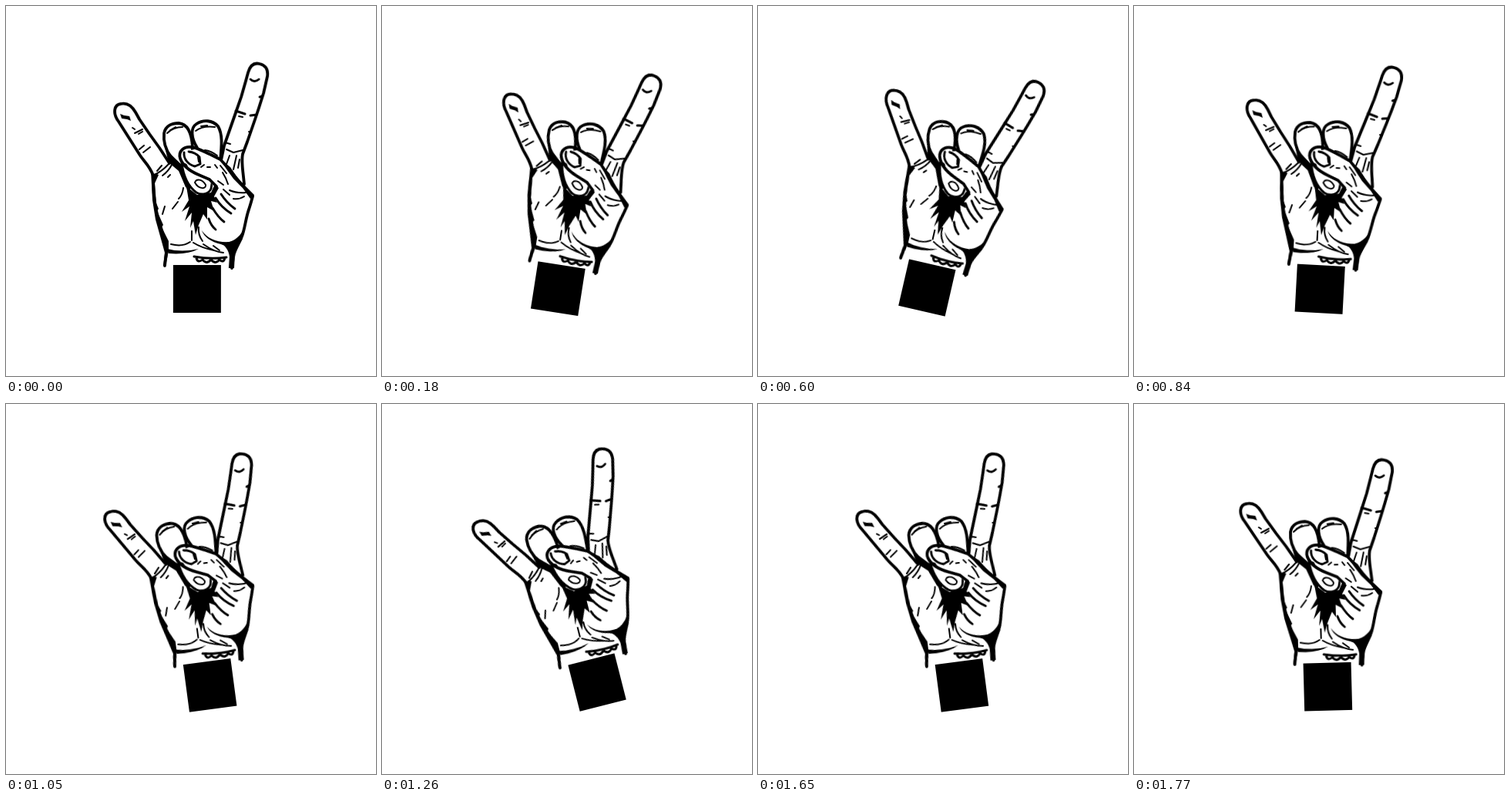
Write an HTML page without scripts that moves like this. It is 480 px wide and 480 px high and loops after 1.8 s.

```html
<!DOCTYPE html>
<html lang="en">
<head>
<meta charset="utf-8">
<title>Rock hand</title>
<style>
html, body { margin: 0; width: 100%; height: 100%; overflow: hidden; background: #fff; }
svg { display: block; width: 100vw; height: 100vh; }
.hand {
  transform-origin: 240px 240px;
  animation: sway 900ms cubic-bezier(.364, 0, .636, 1) -450ms infinite alternate;
}
@keyframes sway {
  from { transform: rotate(-15deg); }
  to { transform: rotate(15deg); }
}
.line, .mid, .fine { fill: none; stroke: #000; stroke-linecap: round; stroke-linejoin: round; }
.line { stroke-width: 3.8; }
.mid { stroke-width: 2.9; }
.fine { stroke-width: 2; }
.skin { fill: #fff; }
</style>
</head>
<body>
<svg viewBox="0 0 480 480" role="img" aria-label="Hand making the horns sign, swaying">
<g class="hand">
  <!-- palm -->
  <path class="line" d="M191 219C191 232 191 246 194 260C196 275 202 289 206 304Q209 314 208 321L206 337"/>
  <path class="line" d="M320 247Q317 258 315 264C311 275 310 289 306 299C301 309 296 317 295 326L293 340"/>
  <path d="M188 214L198 219L193 230L195 256L198 263L196 266L204 284L202 287L211 305L211 318L207 337L204 337L206 320L201 302L194 277L190 252Z"/>
  <path d="M308 290C301 304 288 309 278 306C285 312 289 317 290 325L289 340L296 340L297 322L307 302Z"/>

  <!-- pinky -->
  <path class="line skin" d="M191 220C186 207 180 203 174 194L160 172L146 150C138 139 140 128 149 127C158 125 164 131 168 138L173 147L186 166L199 184L212 204"/>
  <path d="M148 140L153 142L160 143L162 149L157 147L150 146Z"/>
  <path class="fine" d="M167 165L177 160M172 166L177 163M173 186L179 181M178 190L187 183M192 219Q202 215 211 205M196 214L202 207M164 158L167 160"/>

  <!-- index -->
  <path class="line skin" d="M279 200L283 181L290 161L297 141L305 118L311 97L314 86C317 76 322 73 329 75C337 77 340 83 339 91L334 113L328 132L323 147L313 176L307 192C305 202 307 210 309 231"/>
  <path class="mid" d="M317 95Q322 100 328 95"/>
  <path class="mid" d="M298 136L304 138L310 140M317 142L325 141M329 118L332 117"/>
  <path class="fine" d="M302 143L307 144M284 177L291 179M286 186L295 190L307 187M290 194L286 205M299 194L295 212M303 199L301 210M315 163L318 164"/>

  <!-- folded fingers -->
  <path class="line skin" d="M237 238L228 215L214 196C206 185 204 174 205 165C207 155 216 152 224 152C235 153 241 163 242 184Z"/>
  <path class="line skin" d="M248 184C240 171 239 158 247 153C256 147 268 148 275 156C281 166 280 180 278 200"/>
  <path class="fine" d="M209 165Q217 157 229 157M213 161L220 157M246 162Q255 155 271 157M253 156L261 155M258 187Q266 188 274 194"/>
  <path d="M204 176C208 189 218 196 227 205L239 239L233 235L224 214L211 203Z"/>
  <path class="mid skin" d="M228 204C230 219 236 234 247 242C254 246 263 244 266 237L268 225L247 211Z"/>
  <path class="fine" d="M245 229C247 223 255 225 259 232C260 238 250 238 245 229Z"/>

  <!-- thumb -->
  <path class="skin" d="M226 189L252 185L281 202L318 244L288 262L266 229L238 212Z"/>
  <path class="line" d="M273 234L264 225L250 219C238 214 229 206 226 198C223 188 231 182 240 183C250 184 258 190 266 193L278 199L289 211L304 230L320 246"/>
  <path class="mid" d="M231 190C230 199 237 206 245 208L252 205L251 196Q246 190 237 189"/>
  <path class="fine" d="M249 196L250 202M253 209L257 206M261 209L265 209M271 206L274 210M278 207L286 217M281 216Q286 224 288 231M275 227L282 232"/>
  <path d="M277 198L291 209L299 221L310 233L322 245L317 250L307 236L295 224L287 213Z"/>
  <path class="fine" d="M290 239Q299 243 311 242M295 250Q303 251 309 247M282 238L290 245"/>

  <!-- palm shadow -->
  <path d="M234 234L248 245L266 242L271 231L276 236L270 247L274 255L266 253L270 266L261 261L261 277L256 270L250 284L246 297L243 279L239 288L241 268L232 279L238 260L228 267L237 252Z"/>
  <path class="mid" d="M272 249Q279 261 292 269M268 262Q275 274 283 280M279 244Q286 255 297 263M263 276Q266 285 272 290"/>
  <path class="fine" d="M230 236Q229 245 224 250M223 254L216 263M206 260L203 270M203 220Q211 214 215 206M210 222L213 219M241 292L241 304M250 287Q249 297 255 305"/>
  <path d="M254 291C261 302 274 307 290 306C299 305 305 300 308 294C305 310 290 314 279 309C266 306 257 300 254 291Z"/>

  <!-- wrist -->
  <path d="M209 315Q228 320 250 315Q236 323 211 321Z"/>
  <path class="fine" d="M214 309Q229 313 239 306M243 307Q254 314 270 317M256 309Q270 319 282 320M269 311L277 317"/>
  <path class="mid" d="M244 325Q265 329 286 326M247 327Q249 334 255 329Q260 336 266 329Q272 336 277 329Q282 334 284 327"/>

  <rect x="217" y="336" width="62" height="62"/>
</g>
</svg>
</body>
</html>
```
